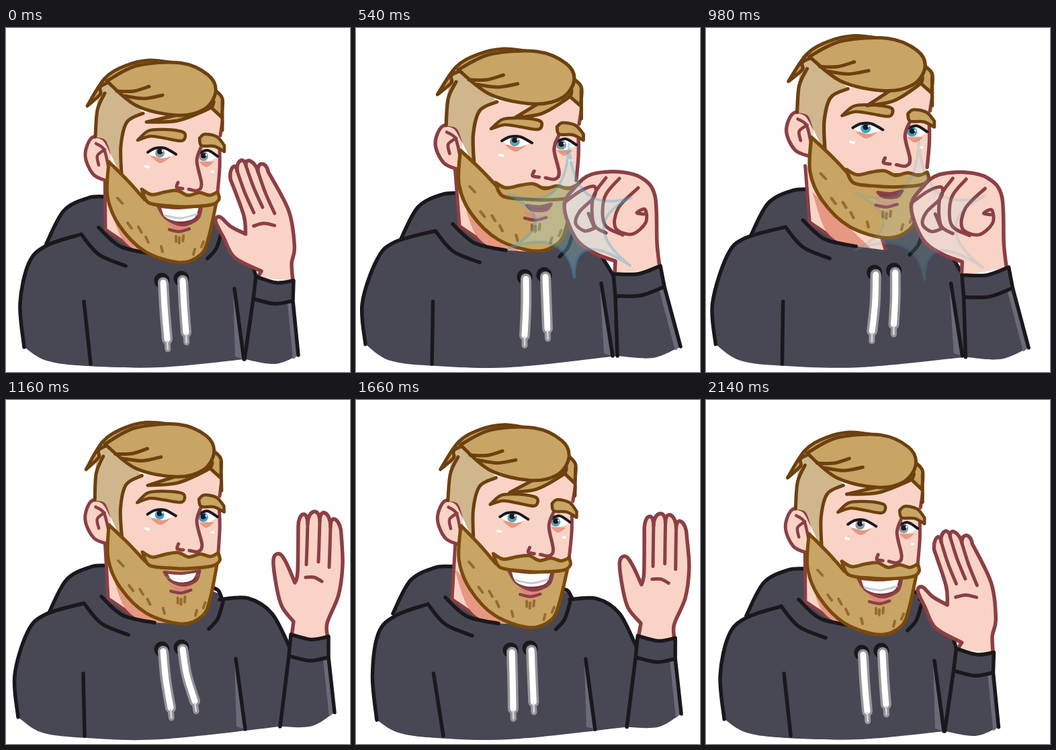
Write an HTML page that moves like this. It is 512 by 512 pixels and loops after 2.16 s.

```html
<!DOCTYPE html>
<html lang="en">
<head>
<meta charset="utf-8">
<title>Whisper and wave</title>
<style>
html, body { margin: 0; width: 100%; height: 100%; overflow: hidden; background: #fff; }
svg { display: block; width: 100vw; height: 100vh; }
path { stroke-linecap: round; stroke-linejoin: round; }
</style>
</head>
<body>
<svg id="stage" viewBox="0 0 512 512"></svg>
<script>
const LOOP = 2160, STEP = 20;
const INK = '#1a181c', CLOTH = '#484854', SHEEN = '#6b6a79';
const SKIN = '#f9d3c6', SKIN_INK = '#8b3f45', SHADE = '#e69882';
const HAIR = '#c8a465', HAIR_INK = '#6d400f', BEARD_INK = '#7a4a0c';

const stage = document.getElementById('stage');
const make = (tag, parent) =>
  parent.appendChild(document.createElementNS('http://www.w3.org/2000/svg', tag));
const set = (el, attrs) => { for (const k in attrs) el.setAttribute(k, attrs[k]); return el; };
const group = parent => make('g', parent);
const lerp = (a, b, k) => a + (b - a) * k;
const NUM = /-?\d+(\.\d+)?/g;
const nums = s => s.match(NUM).map(Number);

// Smooth curve through points; "/" makes the point before it a corner,
// ";" starts a new line and "z" closes one.
function spline(text) {
  return text.split(';').map(part => {
    let last = null, d = '';
    for (const run of part.split('/')) {
      const v = nums(run), p = last ? [last] : [];
      for (let i = 0; i < v.length; i += 2) p.push([v[i], v[i + 1]]);
      if (!last) d = `M${p[0]}`;
      for (let i = 1; i < p.length; i++) {
        const a = p[i - 2] || p[i - 1], b = p[i - 1], c = p[i], e = p[i + 1] || c;
        const at = (m, n, o, s) => m.map((x, j) => (x + s * (o[j] - n[j]) / 6).toFixed(2));
        d += `C${at(b, a, c, 1)} ${at(c, b, e, -1)} ${c}`;
      }
      last = p[p.length - 1];
    }
    return part.includes('z') ? d + 'Z' : d;
  }).join('');
}
function mix(a, b, k) {
  const to = nums(b);
  let i = 0;
  return a.replace(NUM, n => lerp(+n, to[i++], k).toFixed(2));
}
const mix3 = (set3, q, k) => mix(mix(set3[0], set3[1], q), set3[2], k);
function shift(text, dx, dy) {
  let i = 0;
  return text.replace(NUM, n => (+n + (i++ % 2 ? dy : dx)).toFixed(2));
}
const draw = (el, text) => el.setAttribute('d', spline(text));
function path(parent, fill, stroke, width, text) {
  const el = set(make('path', parent), { fill, stroke, 'stroke-width': width });
  if (text) draw(el, text);
  return el;
}
const area = (parent, fill, text) => path(parent, fill, 'none', 0, text);
const line = (parent, stroke, width, text) => path(parent, 'none', stroke, width, text);
const dot = (parent, cx, cy, r, fill) => set(make('circle', parent), { cx, cy, r, fill });

function track(rows, t) {
  let i = 0;
  while (i < rows.length - 2 && t >= rows[i + 1][0]) i++;
  const a = rows[i], b = rows[i + 1];
  const u = Math.min(1, Math.max(0, (t - a[0]) / (b[0] - a[0])));
  const k = (1 - Math.cos(Math.PI * u)) / 2;
  return a.slice(1).map((v, j) => lerp(v, b[j + 1], k));
}

// time, x, y, turn
const HEAD = [[0, 0, 0, 0], [420, 0, -33, 0], [540, 0, -17, 0], [780, 9, -16, 0], [1020, 1, -38, 0],
  [1160, 0, -15, -1.3], [1270, -5, -22, -2], [1460, -8, -2, -.7], [1650, 3, -11, 1], [1880, 17, 6, 5.2], [LOOP, 0, 0, 0]];
// time, shoulder, sway, cord swings
const TORSO = [[0, 0, 0, 8, 7], [420, 5, -16, -4, 0], [540, 6, -13, 0, 5], [780, 9, 6, 4, -3], [1020, 6, -14, -4, 0],
  [1160, 4, -9, 13, 20], [1460, -6, -3, -4, 2], [1880, -4, 12, 13, 9], [LOOP, 0, 0, 8, 7]];
// time, hair lock, iris blue, mouth
const FACE = [[0, 0, 0, 1], [540, .9, .4, 0], [780, 1, .9, 0], [980, 1, 1, 0], [1160, .15, 1, .6],
  [1460, .9, .5, 1.05], [1880, .5, .7, 1.05], [LOOP, 0, 0, 1]];
const FLING = [[960, 0], [1100, .9], [1160, 1], [1230, 1.08], [1455, 0]];
const KISS = [[390, 0], [490, 1], [970, 1], [1090, 0]];
const DRIFT = [[540, 0], [780, 1], [1000, .4], [LOOP, 0]];
// time, opacity, size
const SPARK = [[440, 0, 1.3], [540, .45, 1.15], [680, 1, .96], [780, 1, 1], [900, .9, 1.08], [1020, 0, 1.25]];

function wave(t) {
  if (t > 375 && t < 1455) return track(FLING, t)[0];
  return (1 - Math.cos(2 * Math.PI * (t - 15) / 360)) / 2;
}

// Poses: beside the mouth, waving, kiss
const SLEEVE = ['372 370 428 376 368 403 427 406 355 493 435 487',
  '424 349 480 352 421 381 480 383 408 486 489 465', '383 366 453 354 386 399 459 385 389 488 483 474'];
const FLANK = ['318 297 340 301 356 317 372 370', '318 297 360 295 396 318 424 372', '318 290 340 303 356 325 383 368'];
const SEAM = ['340 388 354 493', '342 385 356 490', '365 380 382 488'];
const THUMB = ['374 372 380 362 / 340 342 323 312 311 288 318 282 334 296 356 307 / 353 279 333 226',
  '425 352 428 330 / 411 308 403 280 398 238 407 229 417 242 430 272 / 434 256 435 188'];
const JOINTS = ['333 226 343 214 356 206 374 215 389 214', '435 188 449 184 467 180 483 188 499 200'];
const EDGE = ['389 214 420 272 429 325 425 350 427 376', '499 200 501 245 495 290 478 332 479 354'];
const CREASE = ['368 295 383 291 399 294', '446 264 459 264 470 270'];
const LOCK = ['209 140 252 130 / 303 109 308 114 300 121 255 138 209 140 z',
  '231 152 270 125 / 303 107 308 114 300 124 268 145 231 152 z'];
const MOUTH = ['246 281 263 283 280 279 / 274 287 262 289 252 287 246 281 z',
  '226 265 258 268 291 265 / 285 284 262 293 238 283 226 265 z'];
const TEETH = ['252 284 262 285 274 283 / 268 285 262 286 256 285 252 284',
  '231 268 258 270 287 267 / 280 283 258 288 238 282 231 268'];

// Layers, back to front
const hood = area(stage, CLOTH), hoodLine = line(stage, INK, 5.5);
const neck = path(stage, SKIN, SKIN_INK, 5), neckShade = area(stage, SHADE);
const body = area(stage, CLOTH), seamSheen = area(stage, SHEEN), bodyLine = line(stage, INK, 5.5);
const head = group(stage), cords = group(stage);

// Ear, shaved side and face
path(head, SKIN, SKIN_INK, 5, '157 185 145 165 127 164 118 190 130 218 152 228');
line(head, SKIN_INK, 4.5, '134 172 146 181 152 205 ; 147 181 136 190 138 204');
area(head, '#cfb68c', '152 80 137 103 133 163 / 148 167 157 190 171 220 / 174 155 206 127');
area(head, SKIN, '171 218 175 150 200 128 / 300 105 / 322 125 318 190 316 245 / 300 290 / 205 262');
line(head, SKIN_INK, 5, '322 140 319 160 ; 318 180 318 208 315 244');
line(head, HAIR_INK, 5, '147 97 136 122 133 162 ; 204 127 180 140 171 175 172 218');

// Eyes
area(head, SHADE, '215 191 / 246 191 / 230 201 215 191 ; 287 199 / 310 199 / 298 207 287 199');
area(head, '#fff', '212 187 222 180 235 180 250 189 / 232 194 212 187 ; 286 189 300 183 314 192 / 301 198 286 189');
const irises = [dot(head, 229, 186, 7), dot(head, 294, 191, 7)];
for (const [x, y] of [[229, 184], [294, 190]]) {
  dot(head, x, y, 4, INK);
  dot(head, x + 4, y - 1, 1.3, '#fff');
}
line(head, INK, 4, '211 185 222 179 237 179 253 188 ; 286 187 300 182 315 191');
line(head, '#fff', 4, '208 206 212 207 ; 306 214 308 214');

// Beard, mouth, moustache and nose
path(head, HAIR, BEARD_INK, 5,
  '153 199 151 250 168 293 206 332 258 349 290 337 302 310 314 255 / 206 255 / 182 228 153 199 z');
const bristles = [[166, 253], [181, 290], [197, 296], [208, 311], [231, 325], [253, 310], [258, 312], [264, 309], [281, 329], [294, 318]];
line(head, '#986b31', 4, bristles.map(([x, y]) => `${x} ${y} ${x + (255 - x) * .08} ${y + 8}`).join(';'));
const lip = area(head, '#e0827e', '240 290 258 294 276 290 / 258 303 240 290');
line(head, SKIN_INK, 4.5, '243 300 258 303 273 299');
const mouth = path(head, '#7f3039', SKIN_INK, 4.5), teeth = area(head, '#fff');
const bite = line(head, '#c9cbd0', 3, '236 279 260 283 284 277');
const stache = path(head, HAIR, BEARD_INK, 5,
  '202 240 217 248 237 244 255 242 271 249 288 245 303 249 315 244 / 317 255 306 263 271 266 245 265 212 260 202 240 z');
line(head, SKIN_INK, 5, '290 178 284 198 291 232 285 242 272 240 ; 256 230 254 237 263 239');

// Brows and hair
path(head, HAIR, HAIR_INK, 4.5, '196 167 212 153 235 151 261 154 267 160 261 168 236 164 215 161 196 167 z ; ' +
  '288 164 296 158 314 162 325 175 / 325 184 / 310 176 291 175 288 164 z');
path(head, HAIR, HAIR_INK, 5, '309 91 322 105 321 133 / 303 116 z ; 322 110 322 152');
const lock = path(head, HAIR, HAIR_INK, 5);
path(head, HAIR, HAIR_INK, 5, '121 116 147 75 178 56 213 48 250 52 / 150 82 140 99 121 116 z');
path(head, HAIR, HAIR_INK, 5, '150 79 195 56 260 52 301 70 312 95 295 121 255 130 195 116 150 79 z');
line(head, HAIR_INK, 5, '165 94 190 94 213 87 ; 176 101 205 105 233 100');

const eyelets = [0, 1].map(() => set(dot(cords, 0, 0, 9, '#2b2930'), { stroke: INK, 'stroke-width': 5 }));
const cordEdge = line(cords, '#96969a', 16), tipEdge = line(cords, '#96969a', 9);
const cordCore = line(cords, '#fff', 9), tipCore = line(cords, '#d8d8da', 2.5);

const palm = group(stage), fist = group(stage);
const hand = path(palm, SKIN, SKIN_INK, 5.5), creases = line(palm, SKIN_INK, 5);
path(fist, SKIN, SKIN_INK, 5.5,
  '385 368 386 347 / 355 335 327 313 310 265 328 235 350 218 390 214 425 223 445 250 448 320 452 356');
line(fist, SKIN_INK, 5, '310 260 335 242 355 236 354 252 333 273 327 291 340 302 355 298 / 346 276 ; ' +
  '372 223 353 252 354 292 372 305 ; 392 224 370 252 370 292 397 308 ; ' +
  '420 238 391 267 386 297 410 307 431 290 430 270 418 275 428 277');
const sleeve = area(stage, CLOTH), sleeveSheen = area(stage, SHEEN), sleeveLine = line(stage, INK, 5.5);
const spark = set(path(stage, '#a4e9f0', '#41abd6', 4), { 'fill-opacity': .6, 'stroke-opacity': .8 });

function drawBody(ux, uy, s, q, k, arm, hx) {
  const top = shift('60 321 86 272 122 253 148 251', ux, uy);
  draw(hood, `${top} / 306 284 322 300 / 300 340 / 115 330`);
  draw(hoodLine, `${top} ; 304 ${283 + uy} 316 ${288 + uy} 322 298`);
  draw(neck, `${147 + hx * .4} 205 / ${shift('148 300 / 215 345', ux, uy)} / 270 340 / 240 240`);
  draw(neckShade, shift('152 255 / 240 340 / 205 336 172 312 152 255', ux, uy));

  const foot = `${27 + s} ${475 + s / 3}`;
  const side = `${foot} ${21 + s * .9} 410 ` + shift('34 350 60 324 112 307', ux * .4 + s * .4, uy).replace(/\S+ \S+$/, '') +
    shift('112 307', ux, uy);
  const collar = shift('138 297 170 325 217 336', ux, uy);
  const flank = mix3(FLANK, q, k), seam = mix3(SEAM, q, k);
  draw(body, `${side} / ${collar} / 300 335 / ${flank} / ${arm[8]} ${arm[9]} / 230 505 120 503 ${60 + s * .7} 495 ${foot}`);
  const [ax, ay, bx, by] = nums(seam);
  draw(seamSheen, `${ax - 2} ${ay + 4} / ${bx} ${by} / ${bx - 13} ${by - 4}`);
  draw(bodyLine, [side, shift('112 307 138 337 178 354', ux, uy), collar,
    shift('300 343 313 328 321 303', ux * .5, uy * .5),
    `${116 + ux * .3 + s * .25} 407 ${126 + s} 500`, seam, flank].join(';'));
}

function drawCords(x, y, swings) {
  const ends = swings.map((d, i) => [232 + x + 29 * i, 376 + y - 3 * i, d, 90 - 7 * i]);
  const all = f => ends.map(e => f(...e)).join(';');
  ends.forEach(([cx, cy], i) => set(eyelets[i], { cx, cy }));
  const cord = all((x, y, d, h) => `${x + 2} ${y + 3} ${x + 2 + d * .3} ${y + h * .5} ${x + d} ${y + h - 3}`);
  const tip = all((x, y, d, h) => `${x + d} ${y + h} ${x + d * 1.1} ${y + h + 12}`);
  draw(cordEdge, cord);
  draw(cordCore, cord);
  draw(tipEdge, tip);
  draw(tipCore, tip);
}

function drawHand(q) {
  const j = nums(mix(JOINTS[0], JOINTS[1], q));
  const vx = lerp(-3, 0, q), vy = lerp(-16, -21, q), fx = lerp(25, -2, q);
  let tips = '', gaps = '';
  for (let i = 0; i < 8; i += 2) {
    const [x, y, nx, ny] = j.slice(i, i + 4);
    tips += `C${x + vx} ${y + vy} ${nx + vx} ${ny + vy} ${nx} ${ny}`;
    if (i) gaps += `${x} ${y} ${x + fx * .45} ${y + 31} ${x + fx} ${y + 61};`;
  }
  const edge = spline(mix(EDGE[0], EDGE[1], q)).replace(/^M[^C]+/, '');
  hand.setAttribute('d', spline(mix(THUMB[0], THUMB[1], q)) + tips + edge);
  draw(creases, gaps + mix(CREASE[0], CREASE[1], q));
}

function drawArm(arm, out, q, k, drift) {
  const [lx, ly, rx, ry, cx, cy, dx, dy, bx, by, ex, ey] = arm;
  const band = (x, y, u, v) => `${x} ${y} ${(x + u) / 2 + 2} ${(y + v) / 2 + 6} ${u} ${v}`;
  const cuff = band(lx, ly, rx, ry);
  draw(sleeve, `${cuff} / ${dx} ${dy} / ${ex} ${ey} / ${(bx + ex) / 2 + 6} ${(by + ey) / 2 + 10} ${bx} ${by} / ${cx} ${cy}`);
  draw(sleeveSheen, `${dx - 8} ${dy + 4} / ${dx} ${dy} / ${ex} ${ey} / ${ex - 8} ${ey + 6}`);
  draw(sleeveLine, `${cuff} / ${dx} ${dy} / ${ex} ${ey} ; ${lx} ${ly} / ${cx} ${cy} / ${bx} ${by} ; ${band(cx, cy, dx, dy)}`);

  const [ox, oy] = nums(mix(SLEEVE[0], SLEEVE[1], q));
  drawHand(q);
  palm.setAttribute('transform', `translate(${lx - ox} ${ly - oy}) rotate(${28 * out * (1 - out)} ${ox + 28} ${oy})`);
  fist.setAttribute('transform', `translate(${lx - 383 - 6 * drift} ${ly - 366 - 2 * drift})`);
  palm.style.display = k < .5 ? '' : 'none';
  fist.style.display = k < .5 ? 'none' : '';
}

const TIPS = [[-1, -101], [80, -32], [78, 56], [6, 71], [-79, 34], [-79, -36]];
function drawSpark(opacity, size) {
  const at = (x, y) => `${318 + x * size} ${289 + y * size}`;
  const d = TIPS.map(([x, y], i) => {
    const [nx, ny] = TIPS[(i + 1) % 6];
    return `Q${at((x + nx) * .06, (y + ny) * .06)} ${at(nx, ny)}`;
  }).join('');
  set(spark, { d: `M${at(...TIPS[0])}${d}Z`, opacity });
}

function render(t) {
  const [hx, hy, turn] = track(HEAD, t), [ux, sway, ...swings] = track(TORSO, t);
  const [lockK, blue, talk] = track(FACE, t), [k] = track(KISS, t), [drift] = track(DRIFT, t);
  const out = wave(t), q = out * out, wide = 1 + .065 * k, open = Math.min(1, talk);
  const arm = nums(mix3(SLEEVE, q, k)).map((n, i) => n + k * drift * (i % 2 ? 4 : -5));

  drawBody(ux, hy * .3, sway, q, k, arm, hx);
  drawCords(19 * k - (t > 1300 ? 2 * Math.sin(Math.PI * (t - 1300) / 860) : 0), hy * .33, swings);
  drawArm(arm, out, q, k, drift);
  drawSpark(...track(SPARK, t));

  head.setAttribute('transform',
    `translate(${hx} ${hy}) rotate(${turn} 225 200) translate(${117 * (1 - wide)} 0) scale(${wide} 1)`);
  draw(lock, mix(LOCK[0], LOCK[1], lockK));
  draw(mouth, mix(MOUTH[0], MOUTH[1], talk));
  draw(teeth, mix(TEETH[0], TEETH[1], talk));
  set(teeth, { opacity: Math.min(1, talk * 2) });
  set(bite, { opacity: Math.max(0, open * 2 - 1) });
  set(lip, { opacity: .6 + .4 * open });
  set(stache, { transform: `translate(0 ${7 * (1 - Math.min(1, talk * 1.5))})` });
  const fill = `rgb(${lerp(140, 58, blue)},${lerp(153, 160, blue)},${lerp(163, 200, blue)})`;
  irises.forEach(el => set(el, { fill }));
}

const start = performance.now();
function tick() {
  const t = (performance.now() - start) % LOOP;
  render(Math.floor(t / STEP) * STEP);
  requestAnimationFrame(tick);
}
tick();
</script>
</body>
</html>
```
